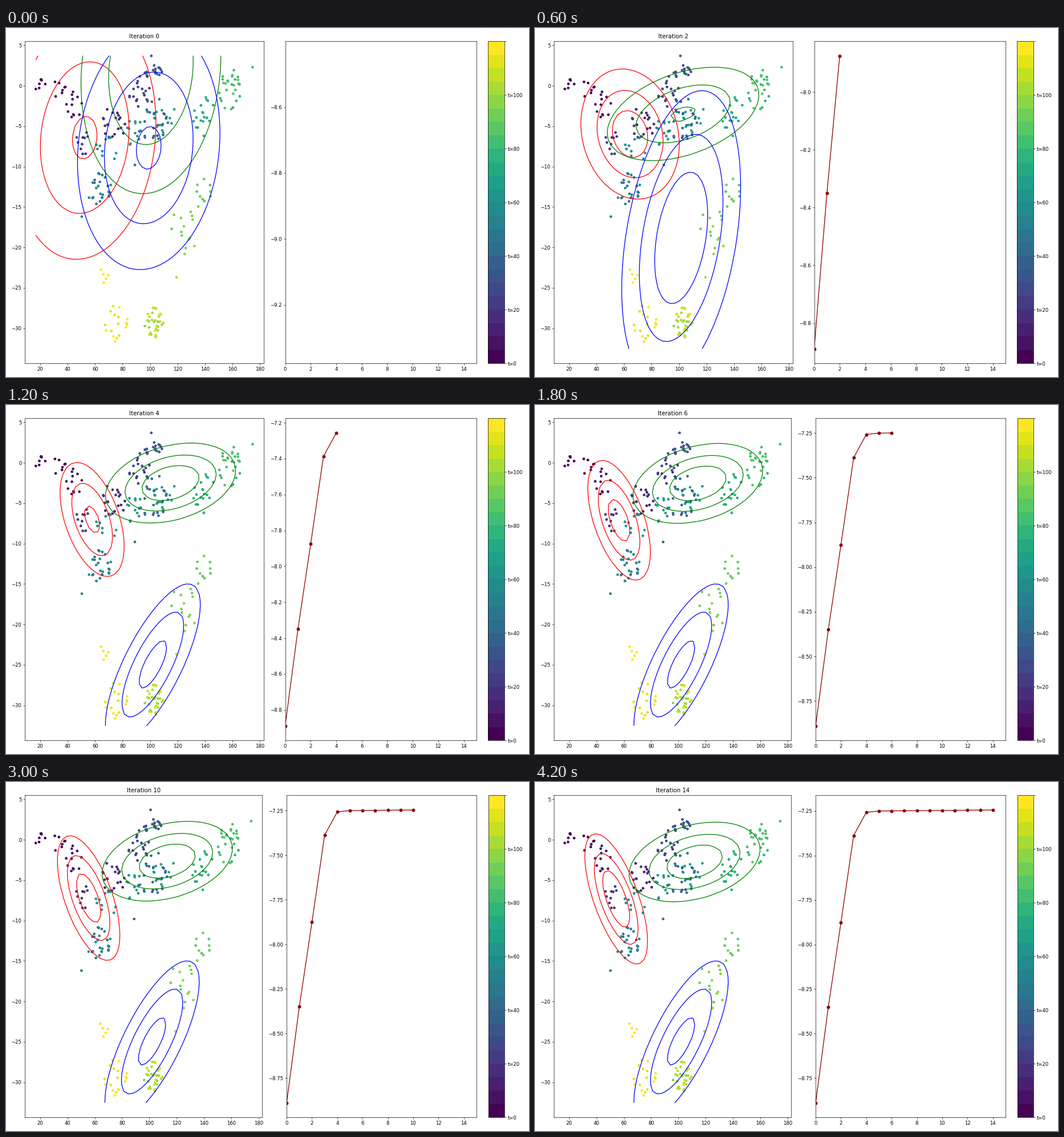
Animation, 917 px wide and 611 px high, one loop 4.5 s. Source, as a matplotlib script:

```python
import numpy as np
import matplotlib.pyplot as plt
from matplotlib.animation import FuncAnimation
from matplotlib.cm import ScalarMappable
from matplotlib.colors import Normalize

W, H, DPI = 917, 611, 61.1
FRAMES, INTERVAL = 15, 300
T_MAX, RATE = 120, 2.5
X_RANGE, Y_RANGE = (16.8, 174.8), (-32.55, 3.72)

# The observations wander between these areas:
# start time, centre x, centre y, half width, half height.
STOPS = [
    (0, 30, 0, 11, 2),
    (5, 45, -2.2, 6, 1.8),
    (10, 73, -4.8, 9, 2.2),
    (18, 51, -7, 5, 1.6),
    (22, 92, -.6, 8, 2),
    (29, 102, 1.7, 8, 1),
    (36, 103, -4.2, 13, 3),
    (47, 63, -12.8, 9, 2),
    (57, 71, -7.7, 11, 1.4),
    (61, 88, -5.6, 6, 2),
    (66, 112, -4, 9, 2.2),
    (70, 139, -3.6, 8, 2.6),
    (77, 158, -.6, 8, 2.8),
    (88, 138, -13, 7, 1.5),
    (92, 126, -17, 11, 4),
    (98, 103, -29.3, 7, 1.9),
    (111, 75, -29.4, 9, 2.3),
    (118, 69, -23, 5, 2.2),
]

# Isolated observations: time, x, y.
STRAYS = [
    (0, 16.8, -.4), (34, 100.9, 3.7), (40, 88.9, -9.8),
    (52, 50.3, -16.2), (82, 174.6, 2.3), (100, 119.2, -23.7),
]

# Iteration, mean x, mean y, deviation x, deviation y, correlation.
COMPONENTS = {
    'red': [
        (0, 52.4, -6.42, 34.4, 10, .118),
        (1, 63, -5.8, 23.5, 6, -.05),
        (2, 64.3, -5.98, 22.5, 5.06, -.16),
        (4, 57.8, -7.02, 15.25, 4.62, -.475),
        (6, 56.6, -7.11, 14.45, 4.68, -.54),
        (14, 54.5, -7.32, 13.9, 4.89, -.66),
    ],
    'green': [
        (0, 100.6, 2.03, 34.4, 10.4, .115),
        (2, 102.9, -3.48, 36.75, 3.84, .41),
        (4, 114.9, -2.51, 28.7, 2.99, .315),
        (14, 111.9, -2.74, 29.3, 3, .32),
    ],
    'blue': [
        (0, 99, -7.69, 34.4, 10, .12),
        (2, 101.5, -18.83, 26.1, 11, .35),
        (4, 102, -24.97, 22.25, 6.43, .745),
    ],
}

# Mean log-likelihood: a steep climb, then a plateau.
SCORES = np.r_[-8.889, -8.35, -7.875, -7.3875, -7.257,
               np.linspace(-7.2495, -7.244, FRAMES - 5)]


def sample_points():
    rng = np.random.default_rng(4)
    stops = np.array(STOPS)
    t = np.arange(0, T_MAX, 1 / RATE)
    _, cx, cy, rx, ry = stops[np.searchsorted(stops[:, 0], t, 'right') - 1].T
    radius = rng.random(len(t)) ** .55
    angle = rng.uniform(0, 2 * np.pi, len(t))
    points = np.c_[t, cx + rx * radius * np.cos(angle),
                   cy + ry * radius * np.sin(angle)]
    return np.vstack([points, STRAYS]).T


def density(color, i):
    rows = np.array(COMPONENTS[color])
    mx, my, sx, sy, rho = (np.interp(i, rows[:, 0], c) for c in rows.T[1:])
    u, v = (GX - mx) / sx, (GY - my) / sy
    q = 1 - rho ** 2
    dist = (u * u - 2 * rho * u * v + v * v) / q
    return np.exp(-dist / 2) / (2 * np.pi * sx * sy * np.sqrt(q))


def place(ax, x0, x1, top=23.4, bottom=587.2):
    ax.set_position([x0 / W, 1 - bottom / H, (x1 - x0) / W, (bottom - top) / H])


GX, GY = np.meshgrid(np.linspace(*X_RANGE, 50), np.linspace(*Y_RANGE, 50))

fig = plt.figure(figsize=((W + .01) / DPI, (H + .01) / DPI), dpi=DPI)
ax_map, ax_score, ax_bar = (fig.add_axes([.1 + .3 * k, .1, .2, .8])
                            for k in range(3))

cmap, norm = plt.get_cmap('viridis', 24), Normalize(0, T_MAX)
pt, px, py = sample_points()
ax_map.scatter(px, py, c=pt, s=20, linewidths=1, cmap=cmap, norm=norm)
ax_map.set_xlim(8.98, 182.7)
ax_map.set_ylim(-34.36, 5.495)
title = ax_map.set_title('')

line, = ax_score.plot([], [], 'o-', color='darkred')
ax_score.set_xlim(0, 15)

bar = fig.colorbar(ScalarMappable(norm, cmap), cax=ax_bar,
                   ticks=range(0, T_MAX + 1, 20))
bar.ax.set_yticklabels([f't={t}' for t in range(0, T_MAX, 20)] + [''])

contours = []


def update(i):
    while contours:
        contours.pop().remove()
    for color in COMPONENTS:
        contours.append(ax_map.contour(GX, GY, density(color, i), 3,
                                       colors=color, linewidths=1.5))
    title.set_text(f'Iteration {i}')

    line.set_data(np.arange(i + 1), SCORES[:i + 1])
    line.set_visible(i > 0)
    ax_score.relim()
    ax_score.autoscale_view(scalex=False)

    # Two-decimal tick labels push the panels slightly apart.
    wide = i >= 5
    place(ax_map, 33.4, 449.3 if wide else 451.9)
    place(ax_score, 492.1 if wide else 489.5, 824.9)
    place(ax_bar, 846 if wide else 845.3, 874.2)
    return []


anim = FuncAnimation(fig, update, frames=FRAMES, interval=INTERVAL,
                     init_func=lambda: update(0), repeat=True, repeat_delay=0)
plt.show()
```
